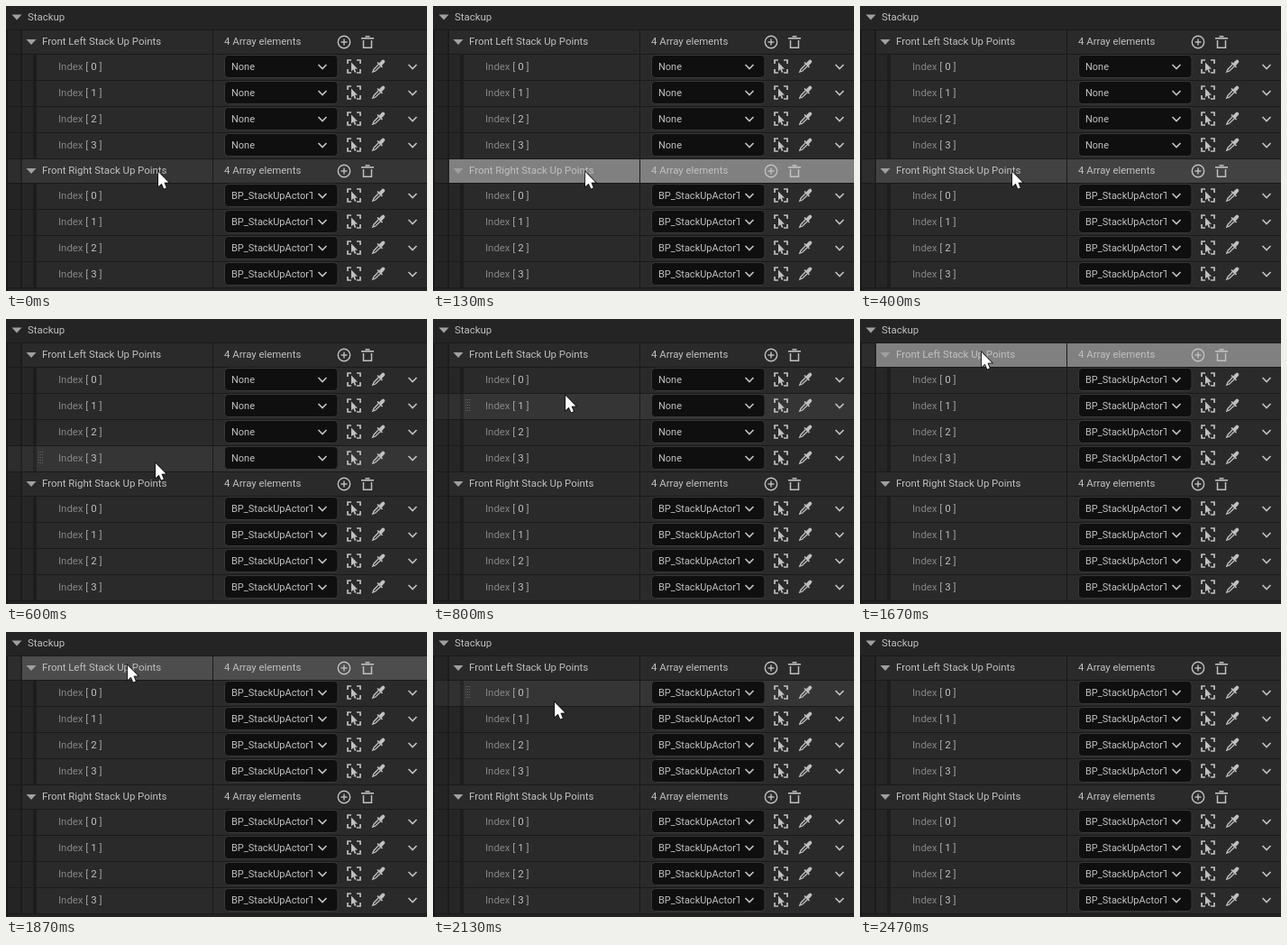
These frames come from a looping animation (467 by 316 pixels, 3140 ms). An HTML page with a canvas:

```html
<!DOCTYPE html>
<html lang="en">
<head>
<meta charset="utf-8">
<title>Stackup array panel</title>
<style>
html, body { margin: 0; height: 100%; overflow: hidden; background: #242424; }
canvas { display: block; }
</style>
</head>
<body>
<canvas id="stage" width="467" height="316"></canvas>
<script>
const ctx = document.getElementById('stage').getContext('2d');
const LOOP = 3140, TICK = 1000 / 15, WIDTH = 467;
const LIGHT = '#c0c0c0', LINE = '#1a1a1a';
const HEADER_HEIGHT = 27, ITEM_HEIGHT = 29, ITEMS = 4;
const GROUP_HEIGHT = HEADER_HEIGHT + ITEMS * ITEM_HEIGHT;
const COPY_TIME = 130, PASTE_TIME = 1670;
// The pulse repaints less often than the cursor
const PULSE_STEPS = [0, 130, 330, 400, 600, 1670, 1800, 1870, 2000, 2070, 2130];
const ARROW = [0, 0, 0, 16, 3.7, 12.7, 6.2, 18.5, 8.8, 17.4, 6.4, 11.7, 11.3, 11.5];

const gray = v => `rgb(${v},${v},${v})`;
const mix = (a, b, p) => a + (b - a) * p;

function rect(x, y, w, h, color) {
  ctx.fillStyle = color;
  ctx.fillRect(x, y, w, h);
}

function text(str, x, y, color = LIGHT, size = 11.4) {
  ctx.font = `${size}px Roboto, sans-serif`;
  ctx.fillStyle = color;
  ctx.fillText(str, x, y);
  return x + ctx.measureText(str).width;
}

function stroke(width = 1.4, color = LIGHT) {
  ctx.lineWidth = width;
  ctx.strokeStyle = color;
  ctx.stroke();
}

function trace(points, x, y, scale = 1) {
  ctx.beginPath();
  for (let i = 0; i < points.length; i += 2) ctx.lineTo(x + points[i] * scale, y + points[i + 1] * scale);
}

function line(points, x, y, width) {
  trace(points, x, y);
  stroke(width);
}

function fill(points, x, y, color, scale) {
  trace(points, x, y, scale);
  ctx.closePath();
  ctx.fillStyle = color;
  ctx.fill();
}

const chevron = (x, y) => line([-4.5, -2, 0, 2.5, 4.5, -2], x, y, 1.7);
const expander = (x, y) => fill([-5.5, -3, 5.5, -3, 0, 3], x, y, '#a0a0a0');

function plusIcon(x, y) {
  ctx.beginPath();
  ctx.arc(x, y, 6.7, 0, 7);
  stroke();
  line([-3.5, 0, 3.5, 0], x, y);
  line([0, -3.5, 0, 3.5], x, y);
}

function trashIcon(x, y) {
  rect(x - 2.5, y - 7, 5, 1.5, LIGHT);
  rect(x - 7, y - 5, 14, 1.6, LIGHT);
  line([-4.5, -2, -4.5, 6.3, 4.5, 6.3, 4.5, -2], x, y, 1.5);
}

function selectIcon(x, y) {
  ctx.setLineDash([8, 6]);
  ctx.lineDashOffset = 4;
  ctx.beginPath();
  ctx.rect(x - 7, y - 7, 14, 14);
  stroke(1.7);
  ctx.setLineDash([]);
  fill(ARROW, x - 3, y - 4.5, LIGHT, 0.62);
}

function pickerIcon(x, y) {
  ctx.lineCap = 'round';
  line([3, -3, 5.3, -5.3], x, y, 4);
  line([-0.5, -4, 4, 0.5], x, y, 1.7);
  line([0, -2, -5, 3.2, -6.2, 6.2, -3.2, 5, 2, 0], x, y, 1.3);
  ctx.lineCap = 'butt';
}

function combo(value, y) {
  ctx.beginPath();
  ctx.roundRect(242.5, y - 12.5, 125.5, 25, 4);
  ctx.fillStyle = '#0f0f0f';
  ctx.fill();
  stroke(1, '#393939');
  ctx.save();
  ctx.beginPath();
  ctx.rect(244, y - 12, 96, 24);
  ctx.clip();
  text(value, 250, y + 4, LIGHT, 11);
  ctx.restore();
  chevron(351, y);
}

function cursorAt(t) {
  if (t < 600) return [169, 184];
  if (t < 1070) {
    const p = 1 - (1 - (t - 600) / 470) ** 1.7;
    return [mix(166, 135, p), mix(160, 37, p)];
  }
  if (t < 2000) return [135, 37];
  return t < 2470 ? [135, mix(37, 285, ((t - 2000) / 400) ** 1.6)] : null;
}

// White pulse on a clicked row, fading over 460 ms
function pulseAlpha(t, start) {
  const p = (PULSE_STEPS.findLast(s => s <= t) - start) / 460;
  return p >= 0 && p < 1 ? 0.37 * (1 - p) ** 2 : 0;
}

function rowBackground(top, height, hover) {
  const lift = hover ? 11 : 0;
  rect(2, top + 1, 16, height - 1, gray(36 + lift * 0.8));
  rect(16, top + 1, 2, height - 1, gray(28 + lift * 0.5));
  rect(18, top + 1, WIDTH, height - 1, gray(42 + lift));
}

function drawHeader(top, side, alpha, hover) {
  const y = top + 14;
  rowBackground(top, HEADER_HEIGHT, hover);
  rect(18, top + 1, WIDTH, HEADER_HEIGHT - 1, `rgba(255,255,255,${alpha})`);
  rect(229, top, 1, HEADER_HEIGHT, LINE);
  expander(28, y);
  text(`Front ${side} Stack Up Points`, 40, y + 3);
  text('4 Array elements', 242, y + 3);
  plusIcon(375, y);
  trashIcon(401, y);
}

function drawItem(top, index, value, hover) {
  const y = top + 14;
  rowBackground(top, ITEM_HEIGHT, hover);
  rect(18, top + 1, 12, ITEM_HEIGHT - 1, gray(hover ? 48 : 38));
  rect(30, top + 1, 4, ITEM_HEIGHT - 1, gray(hover ? 38 : 29));
  rect(229, top, 1, ITEM_HEIGHT, LINE);
  if (hover) {
    for (let d = 0; d < 15; d++) rect(36 + d % 3 * 2, y - 7 + Math.floor(d / 3) * 3, 1, 1, '#686868');
  }
  let x = text('Index ', 58, y + 4, '#848484');
  x = text('[ ', x, y + 4, '#a0a0a0');
  x = text(index, x, y + 4);
  text(' ]', x, y + 4, '#a0a0a0');
  combo(value, y);
  selectIcon(386, y);
  pickerIcon(413, y);
  chevron(451, y);
}

function drawGroup(top, side, value, alpha, cursorY) {
  const hovers = (y, height) => cursorY >= y && cursorY < y + height;
  drawHeader(top, side, alpha, hovers(top, HEADER_HEIGHT));
  for (let i = 0; i < ITEMS; i++) {
    const y = top + HEADER_HEIGHT + i * ITEM_HEIGHT;
    drawItem(y, i, value, hovers(y, ITEM_HEIGHT));
  }
}

function drawCursor(x, y) {
  trace(ARROW, x, y);
  ctx.closePath();
  stroke(1.6, '#111');
  fill(ARROW, x, y, '#fff');
}

function draw(t) {
  const cursor = cursorAt(t), cursorY = cursor ? cursor[1] : -1;
  const actor = 'BP_StackUpActorTest';
  rect(0, 0, WIDTH, 316, LINE);
  rect(0, 0, WIDTH, 26, '#242424');
  expander(12, 12.5);
  text('Stackup', 24, 16);
  drawGroup(26, 'Left', t < PASTE_TIME ? 'None' : actor, pulseAlpha(t, PASTE_TIME), cursorY);
  drawGroup(26 + GROUP_HEIGHT, 'Right', actor, pulseAlpha(t, COPY_TIME), cursorY);
  rect(2, 313, WIDTH, 3, '#242222');
  if (cursor) drawCursor(...cursor);
}

function tick() {
  const now = performance.now() % LOOP;
  const frame = Math.floor((now + 4) / TICK);
  draw(Math.round(frame * TICK / 10) * 10);
  requestAnimationFrame(tick);
}
tick();
</script>
</body>
</html>
```
